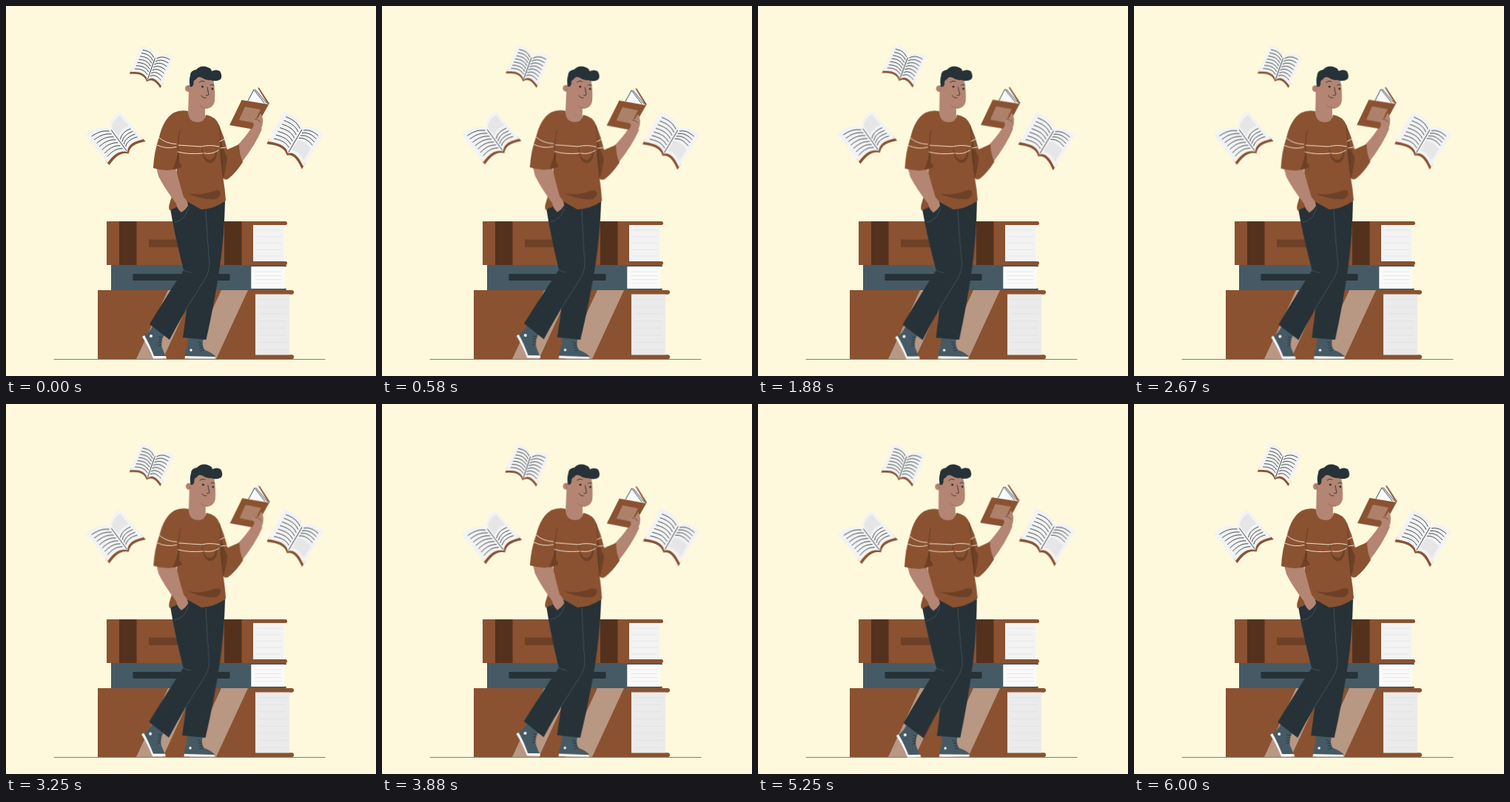
Write an HTML page that moves like this. It is 500 px wide and 500 px high and loops after 6040 ms.

```html
<!DOCTYPE html>
<html lang="en">
<head>
<meta charset="utf-8">
<title>Reader leaning on books</title>
<style>
  html, body { margin: 0; width: 100%; height: 100%; overflow: hidden; background: #fef9dd; }
  svg { display: block; width: 100vw; height: 100vh; }
  .brown { fill: #8a5231; }
  .shade { fill: #6e4127; }
  .band { fill: #53311d; }
  .slate { fill: #455a64; }
  .dark { fill: #263238; }
  .skin { fill: #b38572; }
  .page { fill: #f3f3f3; }
  .white { fill: #fafafa; }
  .grey { fill: #e6e6e6; }
  .pale { fill: #ebebeb; }
  .glare { fill: #b89783; }
  .label { fill: #ad8069; }
  .line, .fold, .seam, .knit, .rule, .crease { fill: none; stroke-linecap: round; stroke-linejoin: round; }
  .line { stroke: #263238; stroke-width: .9; }
  .fold { stroke: #53311d; stroke-width: .6; }
  .seam { stroke: #52646c; stroke-width: .6; }
  .knit { stroke: #f0e0cf; stroke-width: 1; }
  .rule { stroke: #dcdcdc; stroke-width: .6; }
  .crease { stroke: #9b6351; stroke-width: .7; }
  .sway { animation: wind 3020ms linear infinite; transform-box: view-box; }
  #flying { animation-duration: 6040ms; transform-origin: 268px 138px; }
  #man { transform-origin: 268px 279px; }
  @keyframes wind {
    0%, 100% { transform: rotate(0deg); }
    25% { transform: rotate(1deg); }
    75% { transform: rotate(-1deg); }
  }
</style>
</head>
<body>
<svg viewBox="0 0 500 500">
  <g id="flying" class="sway"></g>
  <g id="pile"></g>
  <path class="line" d="M65 477.500H431" style="stroke-width:.6"/>

  <g id="man" class="sway">
    <g id="shoes">
      <path class="slate" d="M199 431L215 443Q208 452 211 462L216 474H200Q194 458 187 446Q194 441 199 431Z"/>
      <path class="white" d="M187 445Q194 457 200 473H216L217 476.500H199Q192 459 184 447Z"/>
      <path class="slate" d="M246 448H267Q264 460 269 465Q280 469 283 474H242Q242 465 245 460Z"/>
      <path class="white" d="M242 473L282 474L283 476.500H241.500Z"/>
      <circle class="white" cx="196" cy="446" r="2"/>
      <circle class="white" cx="250" cy="465" r="1.700"/>
    </g>

    <g id="trousers">
      <path class="dark" d="M262 268L296 264Q295 310 289 352Q282 400 270.500 451L239 448Q246 400 250 350Z"/>
      <path class="dark" d="M222 274L246 260L277 270L275 350Q275 360 268 371Q240 414 221 451L194 430Q222 384 240 357Q228 310 222 274Z"/>
      <path class="seam" d="M270 276Q272 315 275 347Q275 360 268 370L242 412M234 350Q240 360 250 360M228 292Q242 290 246 274"/>
    </g>

    <g id="heldBook">
      <path class="skin" d="M311 190Q324 177 332 164L346 166Q338 186 318 212Z"/>
      <path class="white" d="M326 129L335 113L341 111L354 132Z"/>
      <path class="line" d="M327 128L335 113L349 131M337 113L352 131"/>
      <path class="brown" d="M340 110.500L342 110.500L356 132L354 133Z"/>
      <path class="brown" d="M318.500 127L355 133L336 167L302 161Z"/>
      <path class="label" d="M323 136L344 140L335 158L315 154Z"/>
      <path class="skin" d="M332 166Q338 160 331 153Q336 151 340 152L344 145Q350 153 345 166L340 174Z"/>
      <path class="fold" d="M336 153Q341 153 344 157"/>
    </g>

    <g id="jumper">
      <path class="skin" d="M247 113H269V149Q270 157 258 158Q246 157 246 148Z"/>
      <path class="brown" d="M246 142Q246 156 258 157Q269 157 270 147Q283 149 288 161Q295 177 299 194L315 187Q315 200 320 211Q311 225 301 233Q297 236 293.500 233Q296 248 297 263Q282 274 264 275L246 265L221 276Q219 272 222 264Q230 240 231 218L199 219Q200 197 207 177Q213 152 227 144Q236 140 246 142Z"/>
      <path class="skin" d="M203 218L228 214Q234 238 240 258Q246 264 246 270Q243 275 237 279Q231 274 230 267Q214 246 206 230Z"/>
      <path class="brown" d="M233 190L235 219Q219 225 199 219L204 200Z"/>
      <path class="shade" d="M233 194Q235 206 233 211Q238 213 237 218L225 221Q231 207 233 194Z"/>
      <path class="shade" d="M290 180Q294 196 299 205Q297 222 294 232Q290 214 289 200Z"/>
      <path class="shade" d="M245 253Q263 257 280 250Q289 247 290 252Q291 257 284 261Q267 263 245 253Z"/>
      <path class="shade" d="M266 197Q268 208 276 208Q283 206 284 191Q287 203 281 210Q270 218 266 197Z"/>
      <path class="fold" d="M235 168Q231 185 233 212M288 162Q291 190 293 232M265 189Q264 202 270 209"/>
      <path class="knit" d="M207 178Q216 186 230 186.500M204 188Q217 194 230 190.500M233 188L264 190Q275 187 288 190M232 197Q246 201 266 199M268 199Q278 201 287 195M289 183L295 180M290 192L298 191"/>
    </g>

    <g id="head">
      <circle class="skin" cx="246.500" cy="111.500" r="4.500"/>
      <path class="skin" d="M250 99L258 94L280 99Q283 114 282 129Q280 138 271 138.500Q261 138 255 132L248 119Z"/>
      <path class="dark" d="M248.500 109Q247 99 249 94Q249 87 257 86Q264 79 273 83Q277 84 278 88Q284 85 289 88Q293 94 290 99Q284 103 276 100Q270 101 265 97Q259 94 257 99Q253 100 253.500 105Q253 110 248.500 109Z"/>
      <path class="line" d="M261 103Q264 100 268 102M276 107Q279 105 281 107M272 110L274 120Q272 122 270.500 120.500M264 121Q266 125 270 124"/>
      <circle class="dark" cx="265.500" cy="109" r="1.500"/>
      <circle class="dark" cx="279" cy="112" r="1.400"/>
      <path class="crease" d="M262 134Q267 139 273 138M245 109Q248 110 247 114"/>
    </g>
  </g>
</svg>
<script>
  const mix = (p, q, t) => p.map((v, i) => v + (q[i] - v) * t);
  const steps = (a, b, n) => Array.from({ length: n }, (_, i) => a + (b - a) * i / (n - 1));

  function add(id, tag, attrs) {
    const el = document.createElementNS("http://www.w3.org/2000/svg", tag);
    for (const key in attrs) el.setAttribute(key, attrs[key]);
    document.getElementById(id).append(el);
  }
  const path = (id, cls, d) => add(id, "path", { class: cls, d });
  const rect = (id, cls, x, y, width, height, rx = 0) =>
    add(id, "rect", { class: cls, x, y, width, height, rx });

  // A page bulges along the spine direction; u runs from spine to edge, v from top to bottom.
  function makePage(spine, edge, bulge) {
    const dx = spine[0][0] - spine[1][0], dy = spine[0][1] - spine[1][1];
    const len = Math.hypot(dx, dy);
    const at = (u, v) => {
      const lift = bulge * Math.sin(Math.PI * u ** .75) / len;
      const [x, y] = mix(mix(spine[0], edge[0], u), mix(spine[1], edge[1], u), v);
      return [x + dx * lift, y + dy * lift];
    };
    const curve = (u0, u1, v) => steps(u0, u1, 10).map(u => at(u, v).map(n => n.toFixed(1)));
    return {
      patch: (cls, u0, u1, v0, v1) =>
        path("flying", cls, `M${curve(u0, u1, v0).join("L")}L${curve(u1, u0, v1).join("L")}Z`),
      rows: (n, v0, v1) =>
        path("flying", "line", steps(v0, v1, n).map(v => `M${curve(.1, .82, v).join("L")}`).join(""))
    };
  }

  // Each page holds text, optionally with a grey picture above or below it.
  function openBook(spine, left, right, leftPicture, rightPicture) {
    const pages = [[left, leftPicture], [right, rightPicture]]
      .map(([edge, picture]) => [makePage(spine, edge, 5), picture]);
    for (const [page] of pages) page.patch("brown", 0, 1, .9, 1.08);
    for (const [page, picture] of pages) {
      page.patch("page", 0, 1, 0, 1);
      if (!picture) page.rows(7, .14, .88);
      if (picture === "above") { page.patch("grey", .1, .85, .1, .48); page.rows(4, .58, .88); }
      if (picture === "below") { page.rows(4, .13, .43); page.patch("grey", .1, .85, .53, .9); }
    }
    path("flying", "line", `M${mix(...spine, .06)}L${mix(...spine, .95)}`);
  }

  openBook([[202, 69], [191, 100]], [[183, 54], [168, 89]], [[227, 69], [210, 108]]);
  openBook([[141, 166], [164, 197]], [[107, 174], [137, 212]], [[154, 142], [186, 180]], "", "above");
  openBook([[401, 165], [381, 199]], [[376, 142], [354, 183]], [[429, 173], [402, 217]], "", "below");

  // Closed book seen from the side: spine block, two cover edges and ruled paper.
  function closedBook(cover, paper, x, y, h, spineEnd, paperEnd, coverEnd, edge, lines) {
    rect("pile", cover, x, y, spineEnd - x, h);
    for (const top of [y, y + h - edge])
      rect("pile", cover, spineEnd - 8, top, coverEnd - spineEnd + 8, edge, edge / 2);
    rect("pile", paper, spineEnd, y + edge, paperEnd - spineEnd, h - 2 * edge);
    for (const ly of steps(y + edge + 7, y + h - edge - 7, lines))
      path("pile", "rule", `M${spineEnd + 5} ${ly}H${paperEnd - 4}`);
  }

  closedBook("brown", "page", 136, 291, 59, 334, 376, 380, 5, 5);
  for (const x of [153, 295]) rect("pile", "band", x, 291, 23.5, 59);
  rect("pile", "shade", 193, 315.5, 45, 10.5);

  closedBook("slate", "white", 142, 350, 34, 331.5, 376, 379, 2.3, 4);
  rect("pile", "dark", 171.5, 362, 131, 9);

  closedBook("brown", "pale", 124, 384, 93, 337, 383, 389, 5.7, 8);
  for (const x of [219, 291]) path("pile", "glare", `M${x} 384h36l-43 93h-36Z`);

  // Shoe laces
  for (const i of [0, 1, 2, 3])
    path("shoes", "line", `M${207 - i / 3} ${447 + i * 4}l4 ${1 - i}M${260 + i} ${454 + i * 4}l4 ${2 - i}`);
</script>
</body>
</html>
```
